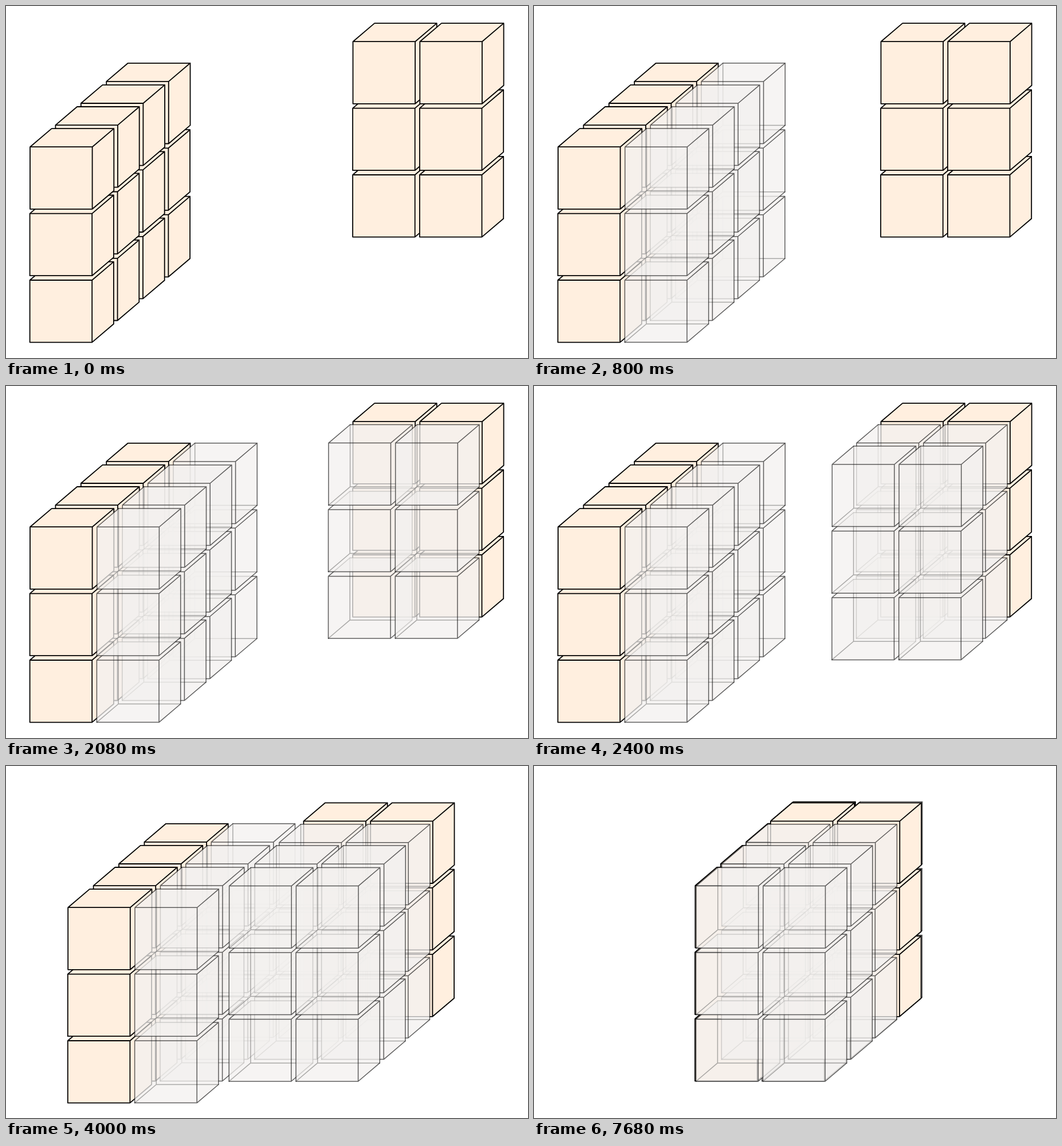
Write an HTML page with a canvas that moves like this. It is 911 by 615 pixels and loops after 9.6 s.

```html
<!DOCTYPE html>
<html lang="en">
<head>
<meta charset="utf-8">
<title>Stacked cubes</title>
<style>
html, body { margin: 0; width: 100%; height: 100%; overflow: hidden; background: #fff; }
canvas { display: block; }
</style>
</head>
<body>
<canvas id="stage" width="911" height="615"></canvas>
<script>
const ctx = document.getElementById('stage').getContext('2d');
const STEP = 800, LOOP = 9600;
const SIDE = 108.6, DX = 37.7, DY = -32.1;  // cube edge and depth vector
const COL = 116.8, ROW = 116.4;             // spacing between neighbours

function path(points, closed) {
  points.forEach(([x, y], i) => i ? ctx.lineTo(x, y) : ctx.moveTo(x, y));
  if (closed) ctx.closePath();
}

function cube(x, y, glass) {
  const r = x + SIDE, b = y + SIDE;
  const outline = [[x, y], [x + DX, y + DY], [r + DX, y + DY], [r + DX, b + DY], [r, b], [x, b]];
  const fill = () => {
    ctx.beginPath();
    path(outline, true);
    ctx.fill();
  };
  ctx.fillStyle = glass ? 'rgba(244,241,239,.5)' : '#ffefdf';
  ctx.strokeStyle = glass ? 'rgba(0,0,0,.62)' : '#000';
  ctx.lineWidth = glass ? 1.5 : 1.8;
  fill();
  if (glass) {
    // hidden edges, veiled by the front faces
    ctx.beginPath();
    path([[x, b], [x + DX, b + DY], [r + DX, b + DY]]);
    path([[x + DX, b + DY], [x + DX, y + DY]]);
    ctx.stroke();
    fill();
  }
  ctx.beginPath();
  path(outline, true);
  path([[x, y], [r, y], [r, b]]);
  path([[r, y], [r + DX, y + DY]]);
  ctx.stroke();
}

// a three-high wall, painted from the bottom up
function wall(x, y, cols, glass) {
  for (let row = 2; row >= 0; row--)
    for (let c = 0; c < cols; c++)
      cube(x + c * COL - (row ? .4 : 0), y + row * ROW, glass);
}

function leftBlock(x, y, full) {
  for (const glass of full ? [false, true] : [false])
    for (let i = 3; i >= 0; i--)
      wall(x + i * 44.4 + (glass ? COL : 0), y - i * 38.1, 1, glass);
}

function rightBlock(x, y, layers) {
  const offsets = [[0, 0], [-42.6, 37.4], [-85.2, 74.8], [-129.8, 113.2]];
  offsets.slice(0, layers + 1).forEach(([dx, dy], i) => wall(x + dx, y + dy, 2, i > 0));
}

function draw(step) {
  const [lx, ly, rx, ry] =
    step < 5 ? [42, 246.2, 605.5, 62.2] :
    step < 6 ? [108.2, 247.2, 519.4, 96.4] :
               [281.4, 209, 412.9, 96.4];
  ctx.fillStyle = '#fff';
  ctx.fillRect(0, 0, 911, 615);
  leftBlock(lx, ly, step > 0);
  rightBlock(rx, ry, Math.max(0, Math.min(3, step - 1)));
}

ctx.lineJoin = ctx.lineCap = 'round';
const start = performance.now();
let shown = -1;

function tick() {
  const t = (performance.now() - start) % LOOP;
  const step = Math.min(6, Math.floor(t / STEP));
  if (step !== shown) draw(shown = step);
  requestAnimationFrame(tick);
}
tick();
</script>
</body>
</html>
```
